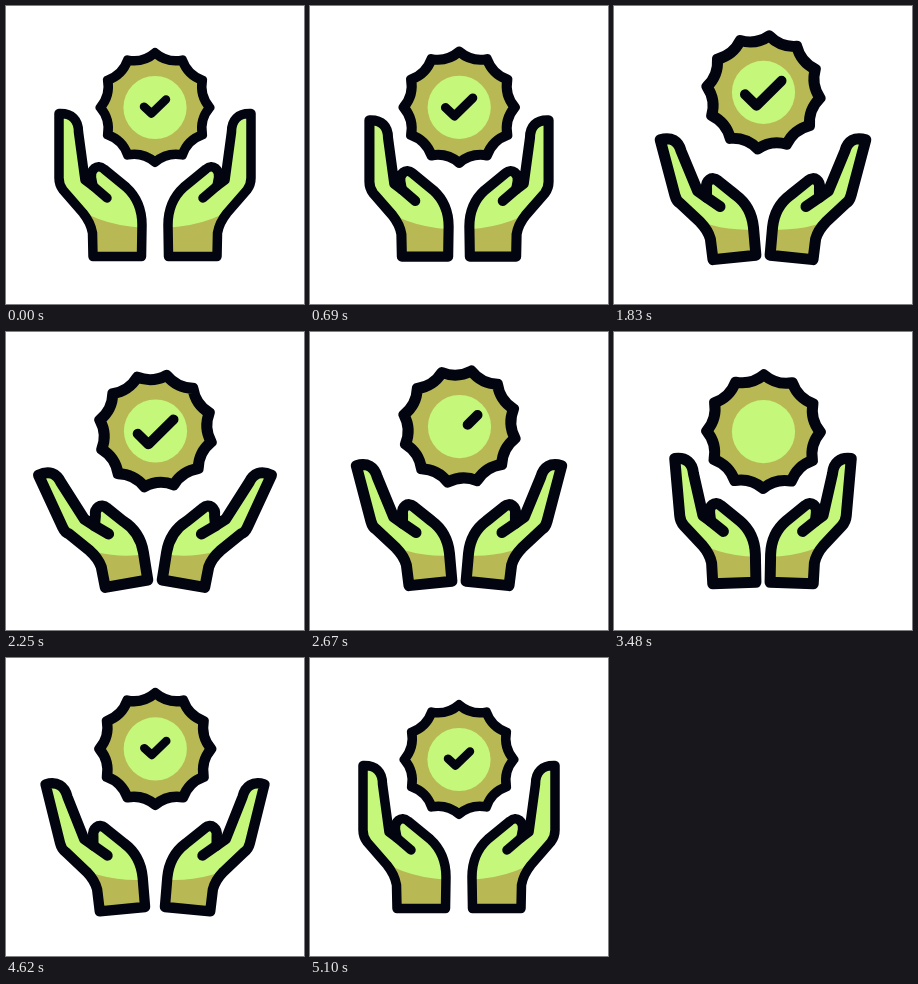
An HTML page with a canvas for the animation above (5.4 s loop, 298 px wide and 298 px high).

```html
<!DOCTYPE html>
<html lang="en">
<head>
<meta charset="utf-8">
<title>Hands and badge</title>
<style>
html, body { margin: 0; width: 100%; height: 100%; overflow: hidden; background: #fff; }
canvas { display: block; width: 298px; height: 298px; }
</style>
</head>
<body>
<canvas id="stage"></canvas>
<script>
const LOOP = 5400, SIZE = 298, AXIS = 149;
const INK = '#02040f', LIME = '#c5f77b', OLIVE = '#b8b954';
const canvas = document.getElementById('stage');
const ratio = window.devicePixelRatio || 1;
canvas.width = canvas.height = Math.round(SIZE * ratio);
const ctx = canvas.getContext('2d');

const linear = u => u;
const smooth = u => (1 - Math.cos(Math.PI * u)) / 2;
const mix = (a, b, u) => a + (b - a) * u;

// Each key is [time in ms, value].
function track(keys, ease) {
  return t => {
    if (t <= keys[0][0]) return keys[0][1];
    for (let i = 1; i < keys.length; i++) {
      const [t0, v0] = keys[i - 1], [t1, v1] = keys[i];
      if (t <= t1) return mix(v0, v1, ease((t - t0) / (t1 - t0)));
    }
    return keys[keys.length - 1][1];
  };
}

const compact = track([[330, 0], [1200, 1], [4240, 1], [5100, 0]], linear);
const spread = track([[1230, 0], [2243, 1], [3290, 0], [4240, 1], [5100, 0]], linear);
const lift = track([[1200, 0], [1770, 15], [2400, 0], [2995, 15], [3600, 0],
                    [4280, 0], [4830, 15], [5100, 0]], smooth);
const turn = track([[1230, 0], [2450, 12], [2700, 12], [3600, 0]], smooth);
const erase = track([[2240, 0], [2830, 1]], linear);
const drawn = track([[4080, 0], [4600, 1]], linear);
const grow = track([[330, 0], [1200, 1]], smooth);

function rotate([x, y], [cx, cy], degrees) {
  const a = degrees * Math.PI / 180, c = Math.cos(a), s = Math.sin(a);
  return [cx + (x - cx) * c - (y - cy) * s, cy + (x - cx) * s + (y - cy) * c];
}

function handPath(open) {
  const wrist = [116.5, 249.4], knuckle = [66, 180], thumbRoot = [101, 192];
  const palm = (x, y) => rotate([x, y], wrist, -10 * open);
  const finger = (x, y) => palm(...rotate([x, y], knuckle, -15 * open));
  const thumb = (x, y) => palm(...rotate([x, y], thumbRoot, 12 * open));

  const body = new Path2D();
  const move = p => body.moveTo(...p);
  const line = p => body.lineTo(...p);
  const curve = (a, b, c) => body.bezierCurveTo(...a, ...b, ...c);
  move(finger(53, 107.5));
  curve(finger(66, 107), finger(72.5, 114), finger(72.5, 126));
  line(finger(79, 174));
  line(palm(87, 180));
  line(thumb(85.5, 172));
  curve(thumb(84, 164), thumb(91, 157), thumb(98, 163));
  line(palm(120, 181));
  curve(palm(131, 191), palm(136, 204), palm(136, 219));
  line(palm(135.5, 250.5));
  line(palm(87, 250.5));
  line(palm(86.5, 227));
  curve(palm(85, 218), palm(81, 212), palm(77, 207));
  line(palm(57, 184));
  curve(finger(54, 180), finger(53, 177), finger(53, 172));
  body.closePath();

  const slot = new Path2D();
  slot.moveTo(...palm(87, 180));
  slot.lineTo(...palm(...thumbRoot));

  const shade = new Path2D();
  shade.moveTo(...palm(60, 194));
  shade.quadraticCurveTo(...palm(91, 221), ...palm(145, 222));
  shade.lineTo(...palm(145, 270));
  shade.lineTo(...palm(60, 270));
  shade.closePath();
  return { body, slot, shade };
}

function drawHand(parts, width) {
  ctx.fillStyle = LIME;
  ctx.fill(parts.body);
  ctx.save();
  ctx.clip(parts.body);
  ctx.fillStyle = OLIVE;
  ctx.fill(parts.shade);
  ctx.restore();
  ctx.lineWidth = width;
  ctx.stroke(parts.body);
  ctx.stroke(parts.slot);
}

function drawHands(t) {
  const small = compact(t), scale = mix(1, 0.89, small);
  const parts = handPath(spread(t));
  for (const side of [1, -1]) {
    ctx.save();
    ctx.translate(AXIS, 0);
    ctx.scale(side, 1);
    ctx.translate(-AXIS + 21.3 * small, 28 * small);
    ctx.scale(scale, scale);
    drawHand(parts, mix(9.5, 11, small) / scale);
    ctx.restore();
  }
}

function drawBadge(t) {
  const size = compact(t), teeth = 12, step = 2 * Math.PI / teeth;
  const outer = mix(54.7, 56.8, size), dip = mix(46, 48, size);
  const point = (r, a) => [r * Math.sin(a), -r * Math.cos(a)];
  ctx.save();
  ctx.translate(mix(149, 149.5, size), mix(101.5, 101, size) - lift(t));
  ctx.beginPath();
  const start = turn(t) * Math.PI / 180;
  ctx.moveTo(...point(outer, start));
  for (let i = 0; i < teeth; i++) {
    const a = start + i * step;
    ctx.quadraticCurveTo(...point(dip, a + step / 2), ...point(outer, a + step));
  }
  ctx.closePath();
  ctx.fillStyle = OLIVE;
  ctx.fill();
  ctx.lineWidth = mix(9.5, 11, size);
  ctx.stroke();
  ctx.beginPath();
  ctx.arc(0, 0, 31.6, 0, 2 * Math.PI);
  ctx.fillStyle = LIME;
  ctx.fill();
  drawCheck(t);
  ctx.restore();
}

function drawCheck(t) {
  const redraw = t > 3500;
  const from = redraw ? 0 : erase(t), to = redraw ? drawn(t) : 1;
  if (to - from < 0.001) return;
  const big = redraw ? 0 : grow(t);
  const corner = (x0, y0, x1, y1) => [mix(x0, x1, big), mix(y0, y1, big)];
  const a = corner(-11, -0.8, -18.5, 2);
  const b = corner(-3.5, 6, -7, 13.3);
  const c = corner(11, -8, 18, -11.5);
  const first = Math.hypot(b[0] - a[0], b[1] - a[1]);
  const total = first + Math.hypot(c[0] - b[0], c[1] - b[1]);
  const bend = first / total;
  const at = u => u < bend
    ? [mix(a[0], b[0], u / bend), mix(a[1], b[1], u / bend)]
    : [mix(b[0], c[0], (u - bend) / (1 - bend)), mix(b[1], c[1], (u - bend) / (1 - bend))];
  ctx.beginPath();
  ctx.moveTo(...at(from));
  if (from < bend && to > bend) ctx.lineTo(...b);
  ctx.lineTo(...at(to));
  ctx.lineWidth = mix(8.5, 10, big);
  ctx.stroke();
}

function render(now) {
  const t = now % LOOP;
  ctx.setTransform(ratio, 0, 0, ratio, 0, 0);
  ctx.fillStyle = '#fff';
  ctx.fillRect(0, 0, SIZE, SIZE);
  ctx.strokeStyle = INK;
  ctx.lineCap = ctx.lineJoin = 'round';
  const pose = t < 330 || t >= 5100 ? 0 : t;
  drawHands(pose);
  drawBadge(pose);
}

const began = performance.now();
function tick() {
  render(performance.now() - began);
  requestAnimationFrame(tick);
}
tick();
</script>
</body>
</html>
```
